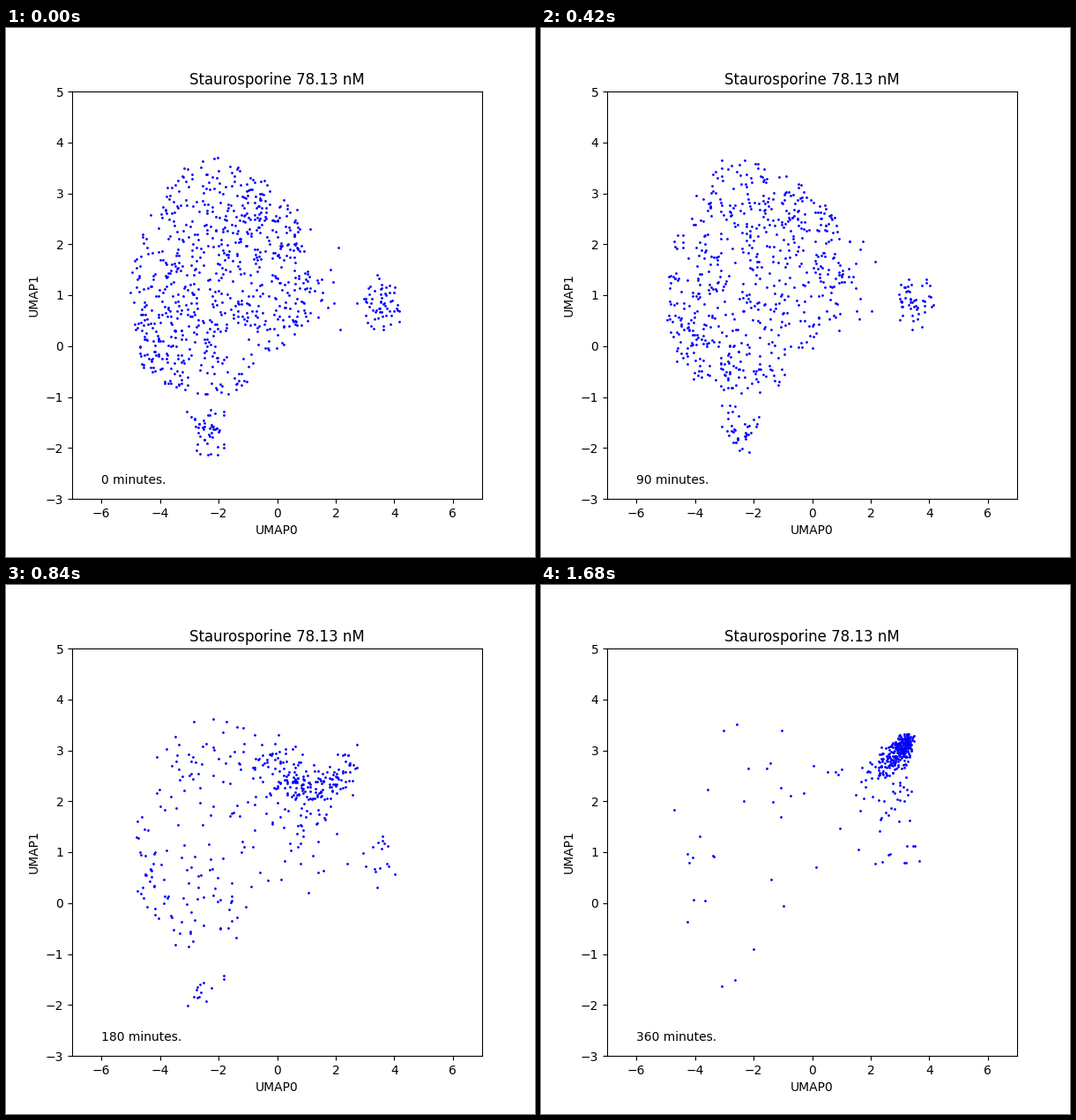
Animation of 600x600 px, one loop 1.82 s. Source, as a matplotlib script:

```python
import numpy as np
import matplotlib.pyplot as plt
from matplotlib.animation import FuncAnimation
from matplotlib.path import Path

STEPS, STEP_MS, STEP_MINUTES = 13, 140, 30

# Rough outline of the healthy population
BODY = Path([(-5.15, 1.0), (-4.6, 2.4), (-3.9, 3.1), (-3.1, 3.7), (-2.0, 3.7),
             (-0.7, 3.35), (0.1, 3.05), (0.8, 2.6), (1.1, 1.2), (0.4, 0.0),
             (-0.4, -0.15), (-1.3, -0.95), (-3.4, -0.95), (-4.6, -0.4)])

# Small groups beside the body: centre, spread, share of healthy cells
ISLAND = (3.45, 0.85), (0.36, 0.27), 0.07
TAIL = (-2.45, -1.65), (0.32, 0.24), 0.055
NECK = (1.2, 1.2), (0.48, 0.55), 0.05

# Route that dying cells follow, ending in a sharp corner
ROUTE = np.array([(-1.0, 3.1), (0.2, 2.6), (1.1, 2.25),
                  (2.0, 2.45), (2.6, 2.85), (3.3, 3.15)])
CORNER = np.array([3.5, 3.32])


def sigmoid(x):
    return 1 / (1 + np.exp(-x))


def bump(pts, centre, spread):
    z = (pts - centre) / np.array(spread)
    return np.exp(-(z ** 2).sum(axis=1) / 2)


def body(rng, n):
    pts = rng.uniform((-5.2, -1.0), (1.2, 3.75), (8000, 2))
    pts = pts[BODY.contains_points(pts)]
    # Denser along the lower left rim and the upper right ridge
    weight = (1 + 1.4 * bump(pts, (-4.4, 0.1), (0.6, 0.6))
              + 1.1 * bump(pts, (-0.4, 2.5), (0.9, 0.4)))
    return rng.choice(pts, n, replace=False, p=weight / weight.sum())


def group(rng, n, centre, spread):
    z = rng.normal(size=(n, 2)).clip(-2, 2)
    return centre + z * spread


def dying(rng, n, step):
    # The crowd moves along the route, easing out towards its end
    mean = np.clip(1 - 0.6 * np.exp((6 - step) / 4), 0.1, 0.9)
    t = rng.beta(5 * mean, 5 * (1 - mean), n)
    knots = np.linspace(0, 1, len(ROUTE))
    pts = np.column_stack([np.interp(t, knots, axis) for axis in ROUTE.T])
    pts += rng.normal(size=(n, 2)) * (0.3 - 0.2 * t)[:, None]
    # Some cells trail below
    pts[:, 1] -= rng.exponential(0.75, n).clip(0, 2) * (rng.random(n) < 0.17)
    return CORNER - abs(CORNER - pts)


def cells(step):
    rng = np.random.default_rng(100 + step)
    healthy = 35 + 840 * sigmoid((4.6 - step) / 1.2)
    moving = 325 * sigmoid((step - 5.8) / 0.8)
    parts = [dying(rng, int(moving), step)]
    body_share = 1.0
    for centre, spread, share in (ISLAND, TAIL, NECK):
        parts.append(group(rng, round(healthy * share), centre, spread))
        body_share -= share
    parts.append(body(rng, round(healthy * body_share)))
    return np.vstack(parts)


fig, ax = plt.subplots(figsize=(6, 6), dpi=100)
ax.set(xlim=(-7, 7), ylim=(-3, 5), xlabel="UMAP0", ylabel="UMAP1",
       title="Staurosporine 78.13 nM")
dots, = ax.plot([], [], "o", color="blue", markersize=1)
label = ax.text(-6, -2.7, "")


def update(step):
    dots.set_data(*cells(step).T)
    label.set_text(f"{step * STEP_MINUTES} minutes.")
    return dots, label


anim = FuncAnimation(fig, update, frames=STEPS, interval=STEP_MS,
                     repeat=True, repeat_delay=0)
plt.show()
```
